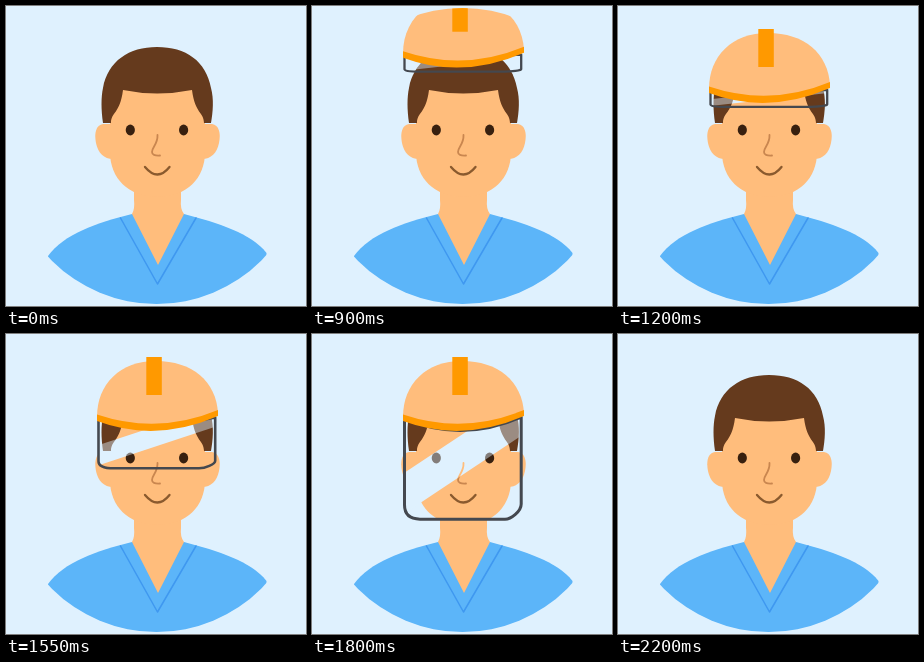
An HTML page that plays this animation: 300x300 px, repeating every 2.4 s.

```html
<!DOCTYPE html>
<html lang="en">
<head>
<meta charset="utf-8">
<title>Face shield</title>
<style>
  html, body { margin: 0; width: 100%; height: 100%; overflow: hidden; background: #dff1fe; }
  svg { display: block; width: 100%; height: 100%; }
</style>
</head>
<body>
<svg viewBox="0 0 300 300" fill="none" stroke-linecap="round" stroke-linejoin="round">
  <defs>
    <clipPath id="disc"><circle cx="150.5" cy="150" r="148"/></clipPath>
    <clipPath id="pane"><path id="paneShape"/></clipPath>
    <clipPath id="gloss" clip-path="url(#pane)"><path id="glossShape"/></clipPath>
    <path id="hair" fill="#653a1d" d="M97 117C95 104 95 91 97 82C102 55 123 41 151 41C180 41 200 55 205 82C208 93 207 106 205 117H198C198 106 189 108 186 84Q151 91 117 84C114 108 105 106 105 117Z"/>
    <g id="eyes" fill="#38200f">
      <ellipse cx="124.3" cy="124" rx="4.6" ry="5.4"/>
      <ellipse cx="177.6" cy="124" rx="4.6" ry="5.4"/>
    </g>
    <path id="nose" stroke-width="1.8" d="M151.500 129C152 138 146 141 146 146Q146 150 154 149.500"/>
    <path id="ear" d="M107 118H97C90 119 88 127 90 137C92 147 98 153 107 153Z"/>
  </defs>

  <rect width="300" height="300" fill="#dff1fe"/>
  <path fill="#5cb5f9" clip-path="url(#disc)" d="M42 250C58 228 90 217 126 208H178C212 217 245 227 260.500 247V300H42Z"/>
  <path fill="#ffbd7c" d="M128 184V194Q129 203 126 208L152 259L178 208Q174 203 175 194V184Z"/>
  <path stroke="#3f98f0" stroke-width="1.5" d="M114.500 212L151.500 278L190 212"/>
  <g fill="#ffbd7c">
    <use href="#ear"/>
    <use href="#ear" transform="matrix(-1 0 0 1 303 0)"/>
    <path d="M104 78H199V146C199 172 181 191 151.500 191C122 191 104 172 104 146Z"/>
  </g>
  <use href="#hair"/>
  <use href="#eyes"/>
  <use href="#nose" stroke="#c9864f"/>
  <path stroke="#8a5a2e" stroke-width="2.3" d="M139 161Q151.500 176 163.500 161"/>

  <g id="gear" clip-path="url(#disc)">
    <g clip-path="url(#gloss)">
      <rect width="300" height="300" fill="#dff1fe"/>
      <g opacity=".55"><use href="#hair"/><use href="#eyes"/></g>
      <use href="#nose" stroke="#ffbd7c"/>
    </g>
    <g id="helmet">
      <path id="frame" stroke="#44484f"/>
      <path fill="#ffbd7c" d="M91 83C91 50 114 27 150 27C186 27 210 47 212 79Q150 104 91 83Z"/>
      <path fill="#ff9900" d="M91 80.500Q152 101 212 76V82Q150 109 91 87Z"/>
      <rect x="140.300" y="23" width="15.500" height="38" fill="#ff9900"/>
    </g>
  </g>
</svg>
<script>
  const LOOP = 2400, STEP = 50;
  const DROP = 700, LOWER = 1450, REMOVE = 2200, SPAN = 500;
  const TOP = 84, FOLDED = 0.155;
  const $ = id => document.getElementById(id);
  const gear = $('gear'), frame = $('frame'), helmet = $('helmet');
  const pane = $('paneShape'), gloss = $('glossShape');

  const easeOut = x => 1 - (1 - Math.min(1, Math.max(0, x))) ** 2;

  function draw(t) {
    const on = t >= DROP && t < REMOVE;
    gear.setAttribute('visibility', on ? 'visible' : 'hidden');
    if (!on) return;

    const lift = -98 * (1 - easeOut((t - DROP) / SPAN));
    const open = easeOut((t - LOWER) / SPAN);
    const scale = FOLDED + (1 - FOLDED) * open;
    const y = (v, dy) => (TOP + (v - TOP) * scale + dy).toFixed(2);

    // The visor and its glare stretch down from the brim.
    const visor = dy => {
      const bottom = y(193.5, dy);
      return `M92.5 ${y(85, dy)}V${y(178, dy)}Q92.5 ${bottom} 108 ${bottom}H193` +
        `C199 ${bottom} 209.2 ${y(185, dy)} 209.2 ${y(177, dy)}` +
        `V${y(83, dy)}Q150 ${y(111, dy)} 92.5 ${y(85, dy)}Z`;
    };
    frame.setAttribute('d', visor(0));
    frame.setAttribute('stroke-width', 2.3 + 0.8 * open);
    helmet.setAttribute('transform', `translate(0 ${lift})`);
    pane.setAttribute('d', visor(lift));
    gloss.setAttribute('d',
      `M92 ${y(143.5, lift)}L182 ${y(79, lift)}H211V${y(102, lift)}L92 ${y(187.5, lift)}Z`);
  }

  const start = performance.now();
  function tick(now) {
    const t = Math.max(0, now - start) % LOOP;
    draw(Math.floor(t / STEP) * STEP);
    requestAnimationFrame(tick);
  }
  draw(0);
  requestAnimationFrame(tick);
</script>
</body>
</html>
```
